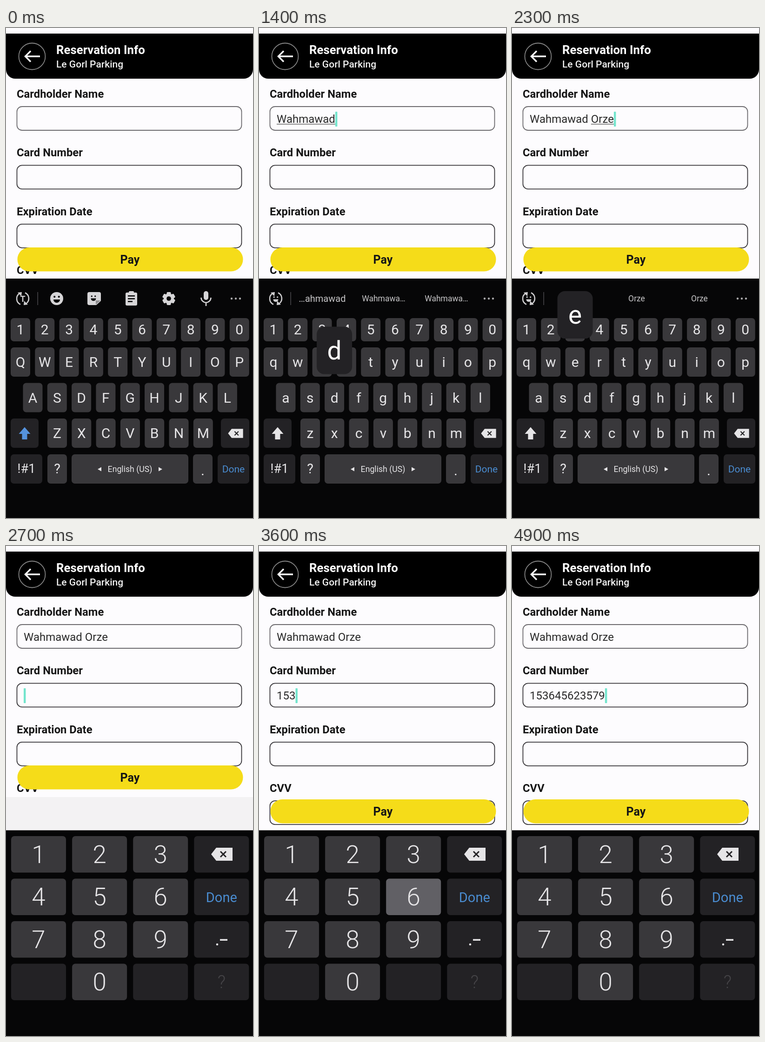
An HTML page with a canvas that plays this animation: 531x1054 px, repeating every 5000 ms.

```html
<!DOCTYPE html>
<html lang="en">
<head>
<meta charset="utf-8">
<title>Card payment form</title>
<style>
html, body { margin: 0; width: 100%; height: 100%; overflow: hidden; background: #060607; }
canvas { display: block; filter: blur(.7px); }
</style>
</head>
<body>
<canvas id="stage" width="531" height="1054"></canvas>
<script>
const c = document.getElementById('stage').getContext('2d');
const LOOP = 5000, STEP = 100;
const PAPER = '#fdfcfe', NIGHT = '#060607', KEY = '#39383b', DARK = '#232225';
const PRESSED = '#616065', LIGHT = '#e6e5e7', BLUE = '#4a8cd0', INK = '#161616';

// Time at which each typed character shows; its key goes down one step before.
const NAME = 'Wahmawad Orze';
const NAME_AT = [200, 400, 600, 800, 900, 1100, 1300, 1400, 1700, 2000, 2100, 2200, 2300];
const CARD = '153645623579';
const CARD_AT = [3100, 3400, 3500, 3700, 3800, 4000, 4100, 4300, 4400, 4600, 4900, 4900];
const DONE_AT = 2400, NUMPAD_AT = 2600, LAYOUT_AT = 2800;

const typed = (word, times, t) => word.slice(0, times.filter(at => at <= t).length);
const charAt = (word, times, t) => word[times.indexOf(t)];

function text(s, x, y, size, color = LIGHT, weight = 400, align = 'center') {
  c.font = `${weight} ${size}px Roboto, sans-serif`;
  c.textAlign = align;
  c.fillStyle = color;
  c.fillText(s, x, y);
  return c.measureText(s).width;
}
function box(x, y, w, h, r, fill) {
  c.beginPath();
  c.roundRect(x, y, w, h, r);
  c.fillStyle = fill;
  c.fill();
}
function disc(x, y, r, fill) {
  c.beginPath();
  c.arc(x, y, r, 0, 7);
  c.fillStyle = fill;
  c.fill();
}
function poly(points, fill) {
  c.beginPath();
  for (let i = 0; i < points.length; i += 2) c.lineTo(points[i], points[i + 1]);
  c.fillStyle = fill;
  c.fill();
}
function stroke(path, color, width) {
  c.strokeStyle = color;
  c.lineWidth = width;
  c.stroke(new Path2D(path));
}

function header() {
  box(0, 12, 531, 97, [0, 0, 20, 20], '#000');
  stroke('M27.5 61a28.5 28.5 0 1 0 57 0a28.5 28.5 0 1 0 -57 0', '#858585', 1.8);
  stroke('M73 61H42M53 49.5L41.5 61L53 72.5', '#fff', 3.4);
  text('Reservation Info', 108, 56, 25.8, '#fff', 700, 'left');
  text('Le Gorl Parking', 108, 85, 21, '#f2f2f2', 500, 'left');
}

function form(t) {
  const name = typed(NAME, NAME_AT, t), card = typed(CARD, CARD_AT, t);
  ['Cardholder Name', 'Card Number', 'Expiration Date', 'CVV'].forEach((label, i) => {
    const y = 169 + i * 126.4;
    text(label, 23, y - 19, 23.8, INK, 700, 'left');
    c.beginPath();
    c.roundRect(23.5, y, 483, 51, 11);
    c.strokeStyle = i ? '#38363a' : '#6c6a6e';
    c.lineWidth = 1.8;
    c.stroke();
  });
  const nameWidth = text(name, 38, 203.5, 24, '#2a2a2a', 400, 'left');
  const cardWidth = text(card, 38, 330, 24, '#2a2a2a', 400, 'left');
  const caretOn = t >= 100 && !(t >= 1800 && t < 2000);
  const onCard = t > DONE_AT;
  const last = name.split(' ').pop();
  if (!onCard && last) {
    const w = c.measureText(last).width;
    box(38 + nameWidth - w, 206, w, 1.4, 0, '#666');
  }
  if (caretOn) box(38 + (onCard ? cardWidth : nameWidth), onCard ? 306 : 180, 4.5, 32, 1, '#74e5cd');

  const payY = t >= LAYOUT_AT ? 545 : 472;
  box(24.5, payY, 485, 51.5, 25.7, '#f5dc19');
  text('Pay', 266.5, payY + 35, 25, INK, 700);
}

function backspace(x, y, s) {
  poly([-23, 0, -12, -14, 23, -14, 23, 14, -12, 14].map((v, i) => v * s + (i % 2 ? y : x)), LIGHT);
  const r = 6 * s, m = x + 3 * s;
  stroke(`M${m - r} ${y - r}l${2 * r} ${2 * r}m0 ${-2 * r}l${-2 * r} ${2 * r}`, DARK, 3 * s);
}

function face(x, y, r, color) {
  disc(x - r * .34, y - r * .28, r * .15, color);
  disc(x + r * .34, y - r * .28, r * .15, color);
  c.beginPath();
  c.arc(x, y + r * .14, r * .5, 0, Math.PI);
  c.fill();
}

function modeIcon(suggesting) {
  const g = '#cfced0';
  stroke('M31 594.5A13.5 13.5 0 0 1 29 571M41 569.5A13.5 13.5 0 0 1 43 593', g, 2.6);
  poly([25, 569, 34, 568, 33, 577], g);
  poly([47, 595, 38, 596, 39, 587], g);
  if (suggesting) face(36, 582, 11, g);
  else text('T', 36, 588.5, 18, g, 700);
}

function toolbar() {
  const g = '#d6d5d7';
  disc(109, 582, 14, g);
  face(109, 582, 14, NIGHT);

  box(175, 568, 29, 28, 4, g);
  poly([205, 586, 205, 597, 193, 597], NIGHT);
  poly([203, 586, 193, 586, 193, 595], '#8d8c8e');
  face(188, 580, 11, NIGHT);

  box(257, 569, 25, 28, 3, g);
  box(264, 566, 11, 7, 2, g);
  for (const y of [575, 581, 587]) box(262, y, y > 585 ? 10 : 15, 2.6, 0, NIGHT);

  c.save();
  c.translate(350, 582);
  for (let i = 0; i < 6; i++) {
    c.rotate(Math.PI / 3);
    box(-4.5, -14, 9, 9, 2, g);
  }
  disc(0, 0, 11, g);
  disc(0, 0, 4.8, NIGHT);
  c.restore();

  box(425, 566, 10, 19, 5, g);
  stroke('M419.5 580a10.5 10.5 0 0 0 21 0M430 590V598', g, 2.6);
}

function suggestions(name) {
  if (name.endsWith(' ')) {
    ['Zawheem', 'Was', 'Is'].forEach((s, i) => text(s, 136 + i * 135, 591, 24, '#c6c5c7'));
    return;
  }
  const word = name.split(' ').pop();
  const full = NAME.split(' ')[name.includes(' ') ? 1 : 0];
  const guess = full.length > 7 ? full.slice(0, 7) + '…' : full;
  const own = word.length > 7 ? '…' + word.slice(1) : word;
  text(own, 136, 589, 20, '#c6c5c7');
  text(guess, 268, 588, 17.5, '#c6c5c7');
  text(guess, 403, 588, 17.5, '#c6c5c7');
}

function keyboard(t) {
  const name = typed(NAME, NAME_AT, t);
  const down = charAt(NAME, NAME_AT, t + STEP);
  const shown = down || charAt(NAME, NAME_AT, t);
  const caps = !name || name.endsWith(' ');
  let popup;

  box(0, 539, 531, 515, 0, NIGHT);
  modeIcon(!!name);
  box(67.5, 568, 1.5, 28, 0, '#4a494c');
  if (name) suggestions(name); else toolbar();
  for (const x of [485, 494, 503]) disc(x, 582, 2.2, '#a9a8aa');

  const rows = [['1234567890', 31, 624, 50], ['QWERTYUIOP', 31, 687, 63],
    ['ASDFGHJKL', 57.5, 763.5, 63], ['ZXCVBNM', 110, 840, 63]];
  rows.forEach(([keys, x0, y, h], row) => [...keys].forEach((k, i) => {
    const x = x0 + i * 52.3, label = caps ? k : k.toLowerCase();
    const same = s => s && s.toUpperCase() === k;
    box(x - 21, y, 42, h, 7, same(down) ? PRESSED : KEY);
    text(label, x, y + (row ? 42 : 35), 30);
    if (same(shown)) popup = [x, y];
  }));

  box(10, 840, 60, 63, 7, DARK);
  poly([40, 858.5, 52.5, 873, 45.5, 873, 45.5, 885, 34.5, 885, 34.5, 873, 27.5, 873], caps ? '#5593de' : LIGHT);
  box(462, 840, 61, 63, 7, DARK);
  backspace(493.5, 872, .7);

  box(10, 917, 68, 63, 7, DARK);
  text('!#1', 44, 957, 27);
  box(89, 917, 42, 63, 7, KEY);
  text('?', 110, 958, 29);
  box(141, 917, 251, 63, 7, down === ' ' ? PRESSED : KEY);
  text('English (US)', 266.5, 955, 17.7);
  poly([197, 949, 205, 944.5, 205, 953.5], LIGHT);
  poly([336, 949, 328, 944.5, 328, 953.5], LIGHT);
  box(402, 917, 42, 63, 7, KEY);
  text('.', 423, 962, 30);
  box(455, 917, 68, 63, 7, t === DONE_AT ? PRESSED : DARK);
  text('Done', 489, 956, 21, BLUE);

  if (popup) {
    const [x, y] = popup;
    box(x - 38, y - 121, 76, 102, 16, DARK);
    text(shown, x, y - 51, 55, '#fff');
  }
}

function numpad(t) {
  const down = charAt(CARD, CARD_AT, t + STEP);
  if (t < LAYOUT_AT) box(0, 540, 531, 72, 0, '#f3f2f3');
  box(0, 611.5, 531, 443, 0, NIGHT);
  [...'123<456D789- 0 ?'].forEach((k, i) => {
    const x = 11 + (i % 4) * 131.1, y = 624 + (i >> 2) * 91.5, mid = x + 59;
    const digit = k >= '0' && k <= '9';
    box(x, y, 118, 78.5, 7, !digit ? DARK : k === down ? PRESSED : KEY);
    if (digit) text(k, mid, y + 57.5, 53, LIGHT, 300);
    else if (k === '<') backspace(464, 663, 1);
    else if (k === 'D') text('Done', mid, y + 50, 29, BLUE);
    else if (k === '-') {
      disc(454, 857, 2.3, LIGHT);
      box(460, 845.5, 16, 3.5, 0, LIGHT);
    } else if (k === '?') text(k, mid, y + 52, 38, '#454447', 300);
  });
}

function draw(now) {
  const t = Math.floor(now % LOOP / STEP) * STEP;
  box(0, 0, 531, 1054, 0, PAPER);
  header();
  form(t);
  if (t < NUMPAD_AT) keyboard(t); else numpad(t);
  requestAnimationFrame(draw);
}
requestAnimationFrame(draw);
</script>
</body>
</html>
```
